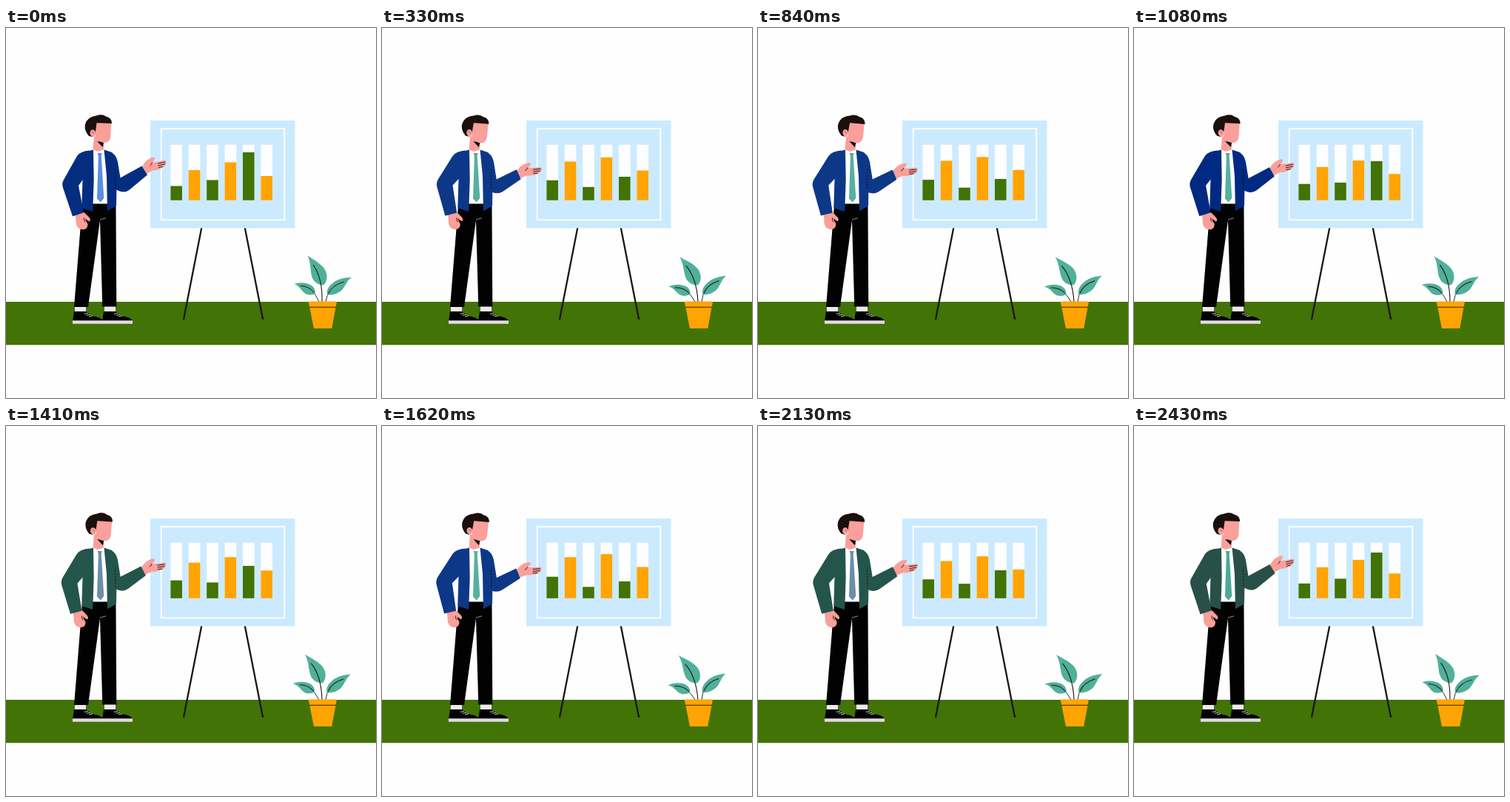
These frames come from a looping animation (500x500 px, 2460 ms). An HTML page with a canvas:

```html
<!DOCTYPE html>
<html lang="en">
<head>
<meta charset="utf-8">
<title>Presentation</title>
<style>
html, body { margin: 0; width: 100%; height: 100%; overflow: hidden; background: #fefefe; }
canvas { display: block; width: 500px; height: 500px; }
</style>
</head>
<body>
<canvas id="stage" width="500" height="500"></canvas>
<script>
const ctx = document.getElementById('stage').getContext('2d');

const LOOP = 2460, STEP = 30, SWING = 600;
const PAPER = '#fefefe', GRASS = '#427306', ORANGE = '#ffa402', SKY = '#cceaff';
const SKIN = '#fa9f9a', HAIR = '#1b0f0d', BLACK = '#020202', LINE = '#1d1513';
const LEAF = '#50b09a', SOLE = '#e3dbe4';

// Tints of the suit and tie by progress of the swing: upper limit, jacket, tie
const TINTS = [
  [0.02, '#042d80', '#5b8fde'],
  [0.12, '#295048', '#4baa96'],
  [0.28, '#002a82', '#55b0a0'],
  [0.45, '#24554b', '#6b8fab'],
  [0.75, '#0d3888', '#56b0a0'],
  [2, '#255059', '#4bb2a0']
];

// Bars: top edge at the start and at the end of the swing
const BARS = [[213.5, 199.5], [192, 171], [205.5, 222.5], [181.5, 169.5], [168, 228], [200, 186.5]];

const lerp = (a, b, p) => a + (b - a) * p;

function fill(path, color) {
  ctx.fillStyle = color;
  ctx.fill(new Path2D(path));
}

function stroke(path, width, color = LINE) {
  ctx.strokeStyle = color;
  ctx.lineWidth = width;
  ctx.stroke(new Path2D(path));
}

function rect(x, y, w, h, color) {
  ctx.fillStyle = color;
  ctx.fillRect(x, y, w, h);
}

function turned(x, y, degrees, draw, dx = 0, dy = 0) {
  ctx.save();
  ctx.translate(x + dx, y + dy);
  ctx.rotate(degrees * Math.PI / 180);
  ctx.translate(-x, -y);
  draw();
  ctx.restore();
}

// Blends two paths that share the same commands
function morph(from, to, p) {
  const ends = to.match(/[\d.]+/g);
  let i = 0;
  return from.replace(/[\d.]+/g, n => lerp(+n, +ends[i++], p).toFixed(2));
}

function drawBoard(p) {
  stroke('M264.3 270L240 394M322.8 270L347.2 394', 2.3);
  rect(195, 125, 195.5, 145.5, SKY);
  stroke('M209.7 136H376.2V259.3H209.7Z', 1.8, '#fff');
  BARS.forEach(([from, to], i) => {
    const x = 222.4 + i * 24.4, top = lerp(from, to, p);
    rect(x, 157.8, 15.6, 75, PAPER);
    rect(x, top, 15.6, 232.8 - top, i % 2 ? ORANGE : GRASS);
  });
}

function drawPlant(p) {
  turned(423, 370, -10.5 * p, () => {
    stroke('M414 355Q419 361 423 370', 0.9);
    fill('M389.5 346C397 343 407 344 413 348C417 351 418.5 355 417.5 359.5C411 361.5 405 361 401 356C397 351 395 348 389.5 346Z', LEAF);
    stroke('M398 348.2Q410 349 416.5 358', 1);
  });
  turned(431, 370, -6 * p, () => {
    stroke('M437 354Q434 361 432 370', 0.9);
    fill('M467 337C456 337 446 340 440 346C435 350 433 355 434 360.5C441 361.5 449 359 454 354C460 347 460 342 467 337Z', LEAF);
    stroke('M457 343Q441 347 435.5 359', 1);
  });
  turned(426.5, 370, -9 * p, () => {
    fill('M407.5 307.5C415 313 424 317 430 325C435 332 435 342 429 347.5C421 347 415 343 413 335C411 326 412 317 407.5 307.5Z', LEAF);
    stroke('M415 320Q428 338 427 370', 1.1);
  });
  fill('M408.5 369.5H447L445.6 377.5L440.2 406H416L410.3 377.5Z', ORANGE);
  stroke('M410 377.3H446', 0.9);
}

function drawShoe(x) {
  rect(x + 3, 375, 15, 10, '#eee9ec');
  fill(`M${x + 2} 383H${x + 18}L${x + 26} 389Q${x + 40} 391 ${x + 41} 396H${x}Z`, BLACK);
  rect(x, 395.3, 41, 4.4, SOLE);
  stroke(`M${x + 16} 386.5L${x + 21} 385.5M${x + 19} 388.3L${x + 24} 387.2M${x + 22} 390L${x + 27} 388.8`, 0.8, '#fff');
}

function drawLegs() {
  drawShoe(90);
  drawShoe(130);
  fill('M103 240L117 236H138L148.5 241L149.3 376.5H130.3L127 260L111 377H92Z', BLACK);
  stroke('M127 259Q131 258 135 256.8', 0.7, '#ccc');
}

function drawHead(p) {
  fill('M119 146L117.5 165Q124 173 132 165L131 150Z', SKIN);
  turned(124, 162, 4.3 * p, () => {
    fill('M123 153L132 154.5L131 161Z', BLACK);
    fill('M121 128H142.2L141.4 146Q141 154 134 155Q127 155 121 149Z', SKIN);
    fill('M112 146Q105 138 107 130Q110 120 122 118.5Q130 115.5 135 119.5Q143 121 143.2 129L122.5 128.3L121 140L117 147Z', HAIR);
    ctx.beginPath();
    ctx.ellipse(117.3, 142, 3.8, 4.7, -0.2, 0, 7);
    ctx.fillStyle = SKIN;
    ctx.fill();
    stroke('M115.8 140.3Q118.5 140 119 143', 0.7, '#8d4d4b');
  });
}

function drawLeftHand(p) {
  turned(98, 250, 1 * p, () => {
    fill('M93.5 252L105.5 249L113 256.5Q115 260 112.5 261.5L106.5 257.5L110.5 265Q110.5 270 107 271.7Q101 273.5 97.5 270Q94 266 94.5 260Z', SKIN);
    stroke('M105.5 256.5Q104.8 261 107.5 262.5', 0.9);
  }, -8.3 * p, -0.5 * p);
}

function drawRightHand(p) {
  turned(187, 193, 14 * p, () => {
    fill('M183 189Q188 179 195 176Q200 173.5 201.3 176Q201 179 197.5 181.5Q205 181.5 212 179Q216.5 178 216.8 181Q216.5 185 213 187.5Q207 192 198 192.5L190 197Z', SKIN);
    stroke('M205 183.2L215 181M205.5 186L215 183.7M206 188.5L212 187.3M197.5 181.5Q197 184.5 194.5 186', 0.9);
  }, -3.7 * p, 10 * p);
}

function drawBody(p, jacket, tie) {
  fill('M117 164L124 167L133 164L138 190L137.5 237.5H117Z', PAPER);
  fill('M123.7 169H129.5L128.8 173.5L132.3 230L127.8 235.5L123 230.5L124.9 173.5Z', tie);
  drawLeftHand(p);
  drawRightHand(p);
  fill('M118 164.5L105 168L101 180L103.5 204L102.3 243.3L117.2 248L118.7 205Z', jacket);
  fill('M132.5 164.5L143 168Q149.5 173 150 184L149 240.5L137 247.2L136 200Z', jacket);
  fill(morph(
    'M113 165.5Q101 166 96 173L78 205Q75 210 77 216L90 254.5L105 249.5L98 213L104.5 204L108 180Z',
    'M113 165.5Q100 166 95 173L74 204Q71 209.5 72.5 215L81.5 253L98 250L93.5 212L103.5 203L108 180Z', p), jacket);
  fill(morph(
    'M138 167Q148.5 169 151 181L154.5 202.5L183.5 186.5L191 198.5L167 218.5Q160 224.5 149 218.5L146 200Z',
    'M138 167Q148.5 169 151 181L155 206L180.5 195L185 208.8L161 222.5Q154 226 148 224.5L146 200Z', p), jacket);
  ctx.setLineDash([2, 2]);
  stroke('M147.5 191L148 218', 0.7, BLACK);
  ctx.setLineDash([]);
}

function draw(now) {
  const time = Math.floor((now % LOOP) / STEP + 1e-6) * STEP;
  const phase = time % (2 * SWING);
  const p = 1 - Math.abs(1 - phase / SWING);
  const [, jacket, tie] = TINTS.find(([limit]) => p < limit);

  rect(0, 0, 500, 500, PAPER);
  rect(0, 370, 500, 58.3, GRASS);
  drawBoard(p);
  drawPlant(p);
  drawLegs();
  drawHead(p);
  drawBody(p, jacket, tie);
}

let start;
function tick(now) {
  start ??= now;
  draw(now - start);
  requestAnimationFrame(tick);
}
draw(0);
requestAnimationFrame(tick);
</script>
</body>
</html>
```
